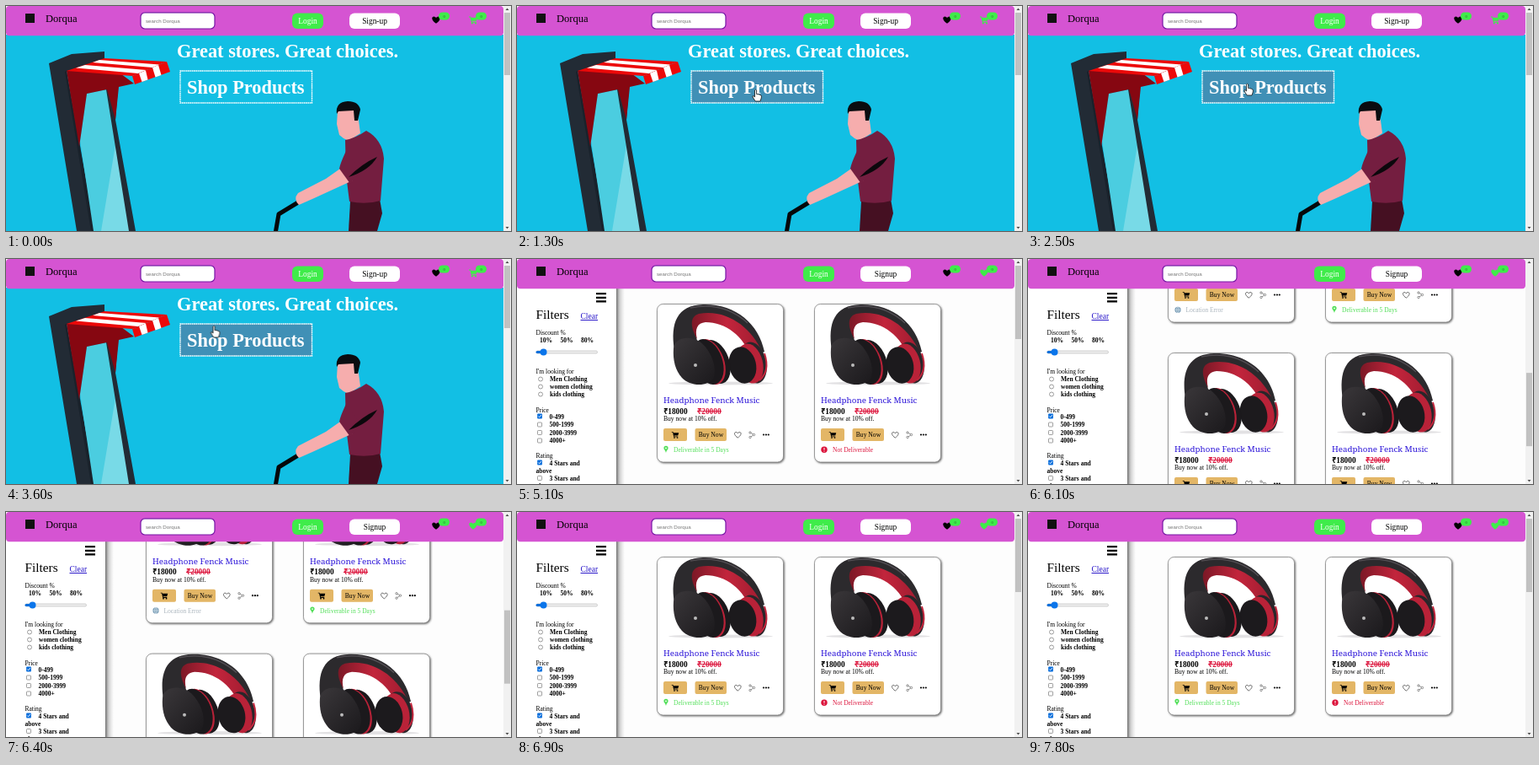
These frames come from a looping animation (600x267 px, 8 s). An HTML page:

```html
<!DOCTYPE html>
<html lang="en">
<head>
<meta charset="utf-8">
<title>Shop demo</title>
<style>
@property --scroll { syntax: "<number>"; inherits: true; initial-value: 0; }
html, body { margin: 0; width: 100%; height: 100%; overflow: hidden; background: #fff; }
svg { display: block; width: 100vw; height: 100vh; font-family: "Liberation Serif", Times, serif; animation: scroll 8s infinite; }
text { white-space: pre; }
.sans { font-family: "Liberation Sans", Arial, sans-serif; fill: #757575; }
.bold { font-weight: bold; }
.slab { font: 9.8px "Noto Serif", serif; fill: #2a12d8; }
.hero { font: bold 22.4px "Liberation Serif", serif; fill: #fff; }
.home { animation: home 8s step-end infinite; }
.shop { animation: shop 8s step-end infinite; }
.list { transform: translateY(calc(var(--scroll) * -1px)); }
.thumb { transform: translateY(calc(var(--scroll) * .326px)); }
.hover { animation: hover 8s step-end infinite; }
.arrow { animation: arrow 8s step-end infinite; }
.cursor { animation: cursor 8s step-end infinite; }

@keyframes home { 0% { opacity: 1 } 63.75%, 100% { opacity: 0 } }
@keyframes shop { 0% { opacity: 0 } 63.75%, 100% { opacity: 1 } }
@keyframes hover { 0% { opacity: 0 } 12.5%, 100% { opacity: 1 } }
@keyframes arrow { 0% { opacity: 0 } 5% { opacity: 1 } 12.5%, 100% { opacity: 0 } }
@keyframes cursor {
  0% { transform: translate(610px, 190px) }
  5% { transform: translate(610px, 190px); animation-timing-function: steps(7, start) }
  13.75% { transform: translate(296px, 112px) }
  15% { transform: translate(289px, 109px) }
  16.25% { transform: translate(285px, 106px) }
  17.5% { transform: translate(284px, 105px) }
  20% { transform: translate(283px, 104px) }
  31.25% { transform: translate(262px, 99px) }
  36.25% { transform: translate(256px, 96px); animation-timing-function: steps(3, start) }
  40% { transform: translate(251px, 92px) }
  43.75% { transform: translate(249px, 89px) }
  45%, 100% { transform: translate(248.5px, 86px) }
}
@keyframes scroll {
  0% { --scroll: 0 }
  68.75% { --scroll: 0; animation-timing-function: steps(5, start) }
  75% { --scroll: 350; animation-timing-function: step-end }
  76.25% { --scroll: 390; animation-timing-function: step-end }
  77.5% { --scroll: 400 }
  80% { --scroll: 400; animation-timing-function: steps(6, start) }
  87.5%, 100% { --scroll: 0 }
}
</style>
</head>
<body>
<svg viewBox="0 0 600 267" preserveAspectRatio="none">
<defs>
  <path id="heart" d="M0 4.3C-6.3 0-5.4-4-2.6-4Q-.8-4 0-2.4Q.8-4 2.6-4C5.4-4 6.3 0 0 4.3Z"/>
  <g id="cart">
    <path d="M-5-4h2l.5 1.3h7.5l-1.2 4h-5.3l.3 1h5v.9h-5.8l-1.5-6.3H-5Z"/>
    <circle cx="-1.2" cy="4.1" r="1"/><circle cx="3" cy="4.1" r="1"/>
  </g>
  <path id="pin" d="M0 4C-1 0-2.6.3-2.6-1.6A2.6 2.6 0 0 1 2.6-1.6C2.6.3 1 0 0 4Z"/>
  <linearGradient id="shade"><stop stop-color="#555" stop-opacity=".85"/><stop offset=".4" stop-color="#888" stop-opacity=".4"/><stop offset="1" stop-color="#aaa" stop-opacity="0"/></linearGradient>
  <linearGradient id="cup" x2="1" y2="1"><stop stop-color="#3a373a"/><stop offset="1" stop-color="#1b191c"/></linearGradient>
  <linearGradient id="lining"><stop stop-color="#7c1826"/><stop offset=".5" stop-color="#c2253c"/><stop offset="1" stop-color="#a01c30"/></linearGradient>
  <filter id="drop" x="-10%" y="-10%" width="120%" height="120%"><feDropShadow dx="1" dy="1" stdDeviation="1.1" flood-color="#333" flood-opacity=".75"/></filter>

  <g id="badge">
    <rect x="-6.5" y="-4.5" width="13" height="9" rx="4.5" fill="#3fec4a"/>
    <text y="1.6" font-size="4.5" text-anchor="middle" fill="#285c2b">0</text>
  </g>

  <g id="headphone">
    <ellipse cx="242" cy="147.500" rx="62" ry="2" fill="#e2e1e3"/>
    <!-- headband and its lining -->
    <path d="M187 108C182 76 190 55 221 54C259 53 287 76 294 110L280 116C270 88 247 73 224 73C211 74 209 84 216 102Z" fill="#2c2a2d"/>
    <path d="M216 65C250 59 279 82 291 110L279 118C269 91 248 75 224 75C214 76 211 83 214 95C205 79 206 68 216 65Z" fill="url(#lining)"/>
    <path d="M206 58Q245 50 274 76" fill="none" stroke="#514d52" stroke-width="1.5"/>
    <!-- far cup -->
    <ellipse cx="281" cy="123" rx="15" ry="25" transform="rotate(-14 281 123)" fill="#29262a"/>
    <ellipse cx="277" cy="124" rx="15" ry="24" transform="rotate(-14 277 124)" fill="#b92238"/>
    <ellipse cx="268" cy="126" rx="16" ry="22" transform="rotate(-14 268 126)" fill="#1c1a1d"/>
    <path d="M294 112Q301 133 288 144" fill="none" stroke="#c2253c" stroke-width="2"/>
    <!-- near cup -->
    <ellipse cx="236" cy="122" rx="16" ry="27" transform="rotate(-20 236 122)" fill="#1b191c"/>
    <ellipse cx="230" cy="122" rx="16" ry="28" transform="rotate(-20 230 122)" fill="#b92238"/>
    <ellipse cx="227" cy="122" rx="17" ry="28" transform="rotate(-20 227 122)" fill="#1b191c"/>
    <path d="M186 106C187 94 204 90 217 98C230 107 239 130 233 142C226 152 205 151 196 141C188 132 185 120 186 106Z" fill="url(#cup)"/>
    <circle cx="212" cy="126" r="2" fill="#bbb"/>
  </g>

  <g id="card">
    <rect x="166.500" y="53.500" width="150" height="187.500" rx="7" fill="#fff" stroke="#777" stroke-width=".7" filter="url(#drop)"/>
    <use href="#headphone"/>
    <text class="slab" x="174" y="171">Headphone Fenck Music</text>
    <g class="bold" font-size="9.3">
      <text x="174" y="183.500">₹18000</text>
      <text x="214" y="183.500" fill="#dc143c">₹20000</text>
    </g>
    <path d="M214 180.800h29" stroke="#dc143c"/>
    <text x="174" y="192" font-size="7.600">Buy now at 10% off.</text>
    <g fill="#e3b666"><rect x="174" y="201" width="28" height="15" rx="2"/><rect x="211.500" y="201" width="37.500" height="15" rx="2"/></g>
    <use href="#cart" transform="translate(188 208.500) scale(.85)"/>
    <text x="215.800" y="211.200" font-size="7.600">Buy Now</text>
    <use href="#heart" transform="translate(262.300 208.700) scale(.8)" fill="none" stroke="#333" stroke-width=".9"/>
    <g fill="#fff" stroke="#666" stroke-width=".7">
      <path d="M277 206l4.500 2.500-4.500 3" fill="none"/>
      <circle cx="277" cy="206" r="1.200"/><circle cx="281.500" cy="208.500" r="1.200"/><circle cx="277" cy="211.500" r="1.200"/>
    </g>
    <circle cx="293" cy="208.500" r="1.100"/><circle cx="295.900" cy="208.500" r="1.100"/><circle cx="298.800" cy="208.500" r="1.100"/>
  </g>
  <g id="delivered" fill="#52df59" font-size="7.5">
    <use href="#pin" x="177" y="226"/><circle cx="177" cy="224.400" r=".9" fill="#fff"/>
    <text x="186" y="229">Deliverable in 5 Days</text>
  </g>
  <g id="refused" fill="#dc143c" font-size="7.5">
    <circle cx="178" cy="226.300" r="3.700"/>
    <path d="M178 224v2.700m0 1v1" stroke="#fff"/>
    <text x="188" y="229">Not Deliverable</text>
  </g>
  <g id="unknown" fill="#a9b4bc" font-size="7.5">
    <circle cx="178" cy="226.300" r="3.600" fill="#7499b4"/>
    <path d="M174.400 226.300h7.200M178 222.700v7.200" stroke="#dce8ee" stroke-width=".6"/>
    <ellipse cx="178" cy="226.300" rx="1.700" ry="3.500" fill="none" stroke="#dce8ee" stroke-width=".6"/>
    <text x="187.500" y="229">Location Error</text>
  </g>
  <g id="row"><use href="#card"/><use href="#card" x="187"/></g>

  <circle id="radio" r="2.500" fill="#fff" stroke="#767676" stroke-width=".7"/>
  <rect id="box" x="-2.500" y="-2.500" width="5" height="5" rx=".8" fill="#fff" stroke="#767676" stroke-width=".7"/>
  <g id="checked"><rect x="-2.900" y="-2.900" width="5.800" height="5.800" rx=".9" fill="#0b6fdc"/><path d="M-1.700 0l1.200 1.300 2.300-2.700" fill="none" stroke="#fff" stroke-width=".9"/></g>
</defs>

<rect width="600" height="267" fill="#fff"/>

<g class="home">
  <rect y="34" width="591" height="233" fill="#12bfe4"/>
  <!-- storefront -->
  <path d="M51 68L78 57 117 54V63L72 78 103 267H84Z" fill="#222b35"/>
  <path d="M72 77L88 166 106 267H101L70 78Z" fill="#19222b"/>
  <path d="M88 160L96 104 120 99 147 267H104Z" fill="#4bcde0"/>
  <path d="M130 165L147 267H113Z" fill="#78dae7"/>
  <path d="M119 99L133 98 130 135 154 267H146Z" fill="#222b35"/>
  <path d="M72 77L117 66 152 92 134 96 130 135 120 99 96 104 87 167Z" fill="#860711"/>
  <path d="M72 77L117 62 191 66 150 83Z" fill="#ec0909"/>
  <g fill="#fff">
    <path d="M83 73.500L94 70 167 76 157 80Z"/>
    <path d="M103 67L111 64 182 69.500 174 73Z"/>
  </g>
  <path d="M150 83L191 66 195 78 153 93Z" fill="#ec0909"/>
  <g fill="#fff"><path d="M158 79.800l8-3.400 2.500 11.200-7 2.400Z"/><path d="M174 73l7-3 3.500 12-7 2.400Z"/></g>
  <!-- shopper -->
  <path d="M320 270L324 247 352 230" fill="none" stroke="#05080a" stroke-width="5" stroke-linecap="round" stroke-linejoin="round"/>
  <path d="M394 124L414 121 419 136 421 151 407 160 401 157 396 153 393 140Z" fill="#f6adad"/>
  <path d="M393 128Q391 114 406 113Q419 113 421 123L418 136 414 136 413 124 395 125Z" fill="#0a0c10"/>
  <path d="M409 232L444 229 447 246 441 267H407Z" fill="#451022"/>
  <path d="M403 159Q415 157 428 148Q447 158 449 181L445 231Q428 236 408 232L404 200Z" fill="#741e40"/>
  <path d="M407 186L380 205 347 222Q341 229 348 236L364 229 388 218 412 207Z" fill="#f6adad"/>
  <path d="M404 172Q397 187 396 193L409 211 421 196Z" fill="#741e40"/>
  <path d="M441 179Q432 195 407 203Q423 187 441 179Z" fill="#0c080c"/>

  <text class="hero" x="203" y="61">Great stores. Great choices.</text>
  <rect class="hover" x="207" y="77" width="156" height="38" fill="#4090b6"/>
  <rect x="207" y="77" width="156.500" height="38" fill="none" stroke="#fff" stroke-width="1.400" stroke-dasharray="1.700 .6"/>
  <text class="hero" x="215" y="104">Shop Products</text>
</g>

<g class="shop">
  <rect x="118" y="34" width="473" height="233" fill="#fdfdfd"/>
  <g class="list">
    <use href="#row"/><use href="#delivered"/><use href="#refused" x="187"/>
    <use href="#row" y="224"/><use href="#unknown" y="224"/><use href="#delivered" x="187" y="224"/>
    <use href="#row" y="448"/><use href="#delivered" y="448"/><use href="#refused" x="187" y="448"/>
  </g>
  <rect y="34" width="118" height="233" fill="#fff"/>
  <rect x="118" y="35" width="10" height="232" fill="url(#shade)"/>
  <path d="M94 41.200h12m-12 4.600h12m-12 4.600h12" stroke="#000" stroke-width="2.200"/>
  <text x="22.500" y="70.500" font-size="15.300">Filters</text>
  <text x="75.500" y="71" font-size="9.500" fill="#2310c8" text-decoration="underline">Clear</text>
  <g font-size="7.5">
    <text x="22.500" y="90.300">Discount %</text>
    <text x="22.500" y="136">I'm looking for</text>
    <text x="22.500" y="181.800">Price</text>
    <text x="22.500" y="235.500">Rating</text>
    <g class="bold">
      <text x="27" y="99.300">10%</text><text x="51.500" y="99.300">50%</text><text x="76" y="99.300">80%</text>
      <text x="39" y="145">Men Clothing</text><text x="39" y="154">women clothing</text><text x="39" y="163">kids clothing</text>
      <text x="38.500" y="190">0-499</text><text x="38.500" y="199.300">500-1999</text><text x="38.500" y="208.600">2000-3999</text><text x="38.500" y="218">4000+</text>
      <text x="38.500" y="244.500">4 Stars and</text><text x="22.500" y="253.500">above</text>
      <text x="38.500" y="262.500">3 Stars and</text><text x="22.500" y="271.500">above</text>
    </g>
  </g>
  <rect x="23" y="109" width="72.500" height="3" rx="1.500" fill="#efefef" stroke="#b2b2b2" stroke-width=".6"/>
  <path d="M24 110.500h7" stroke="#0b6fdc" stroke-width="3" stroke-linecap="round"/>
  <circle cx="31.500" cy="110.500" r="4" fill="#0b75ea"/>
  <use href="#radio" x="28" y="142.500"/><use href="#radio" x="28" y="151.500"/><use href="#radio" x="28" y="160.500"/>
  <use href="#checked" x="27" y="186.500"/><use href="#box" x="27" y="196.500"/><use href="#box" x="27" y="206"/><use href="#box" x="27" y="215.500"/>
  <use href="#checked" x="27" y="241.500"/><use href="#box" x="27" y="260"/>
</g>

<!-- navigation bar -->
<rect width="591" height="35.200" rx="4" fill="#d554d2"/>
<rect x="23" y="9" width="11" height="11" fill="#111"/>
<text x="47" y="19" font-size="12.500">Dorqua</text>
<rect x="160" y="7.800" width="88" height="19.200" rx="5" fill="#fff" stroke="#7617a5" stroke-width="1.200"/>
<text class="sans" x="166" y="19.800" font-size="6.200">search Dorqua</text>
<rect x="340" y="8.600" width="37" height="18.400" rx="6" fill="#3fec4a"/>
<text x="358.500" y="21" font-size="9.400" text-anchor="middle" fill="#fff">Login</text>
<rect x="408" y="8.600" width="60" height="18.400" rx="6" fill="#fff"/>
<g font-size="9.400" text-anchor="middle">
  <text class="home" x="438" y="21">Sign-up</text>
  <text class="shop" x="438" y="21">Signup</text>
</g>
<use href="#heart" x="511" y="16.500"/>
<use href="#badge" x="520.500" y="12"/>
<g fill="#3fec4a">
  <g class="home"><use href="#cart" x="555" y="16.500"/></g>
  <g class="shop"><use href="#heart" x="555" y="16.500"/></g>
</g>
<use href="#badge" x="564.500" y="12"/>

<!-- scrollbar -->
<rect x="591" width="9" height="267" fill="#f1f1f1"/>
<path d="M593.500 5l2-2.500 2 2.500Zm0 257l2 2.500 2-2.500Z" fill="#505050"/>
<rect class="home" x="592" y="8" width="7" height="74" fill="#c1c1c1"/>
<g class="shop"><rect class="thumb" x="592" y="8" width="7" height="87" fill="#c1c1c1"/></g>

<!-- pointer -->
<g class="home"><g class="cursor" fill="#fff" stroke="#111" stroke-width=".8" stroke-linejoin="round">
  <path class="arrow" d="M-2-7V5L.8 2.500 2.500 6.500 4.500 5.600 2.800 1.800H6.500Z"/>
  <path class="hover" d="M-2.500-6Q-1.500-7.500-.4-6V-1.500L1.500-1.300 3.500-.7 5 0Q5.700 .8 5.300 3L4 7H-1.800L-5 2Q-5.500 .5-4 .6L-2.500 2Z"/>
</g></g>
</svg>
</body>
</html>
```
